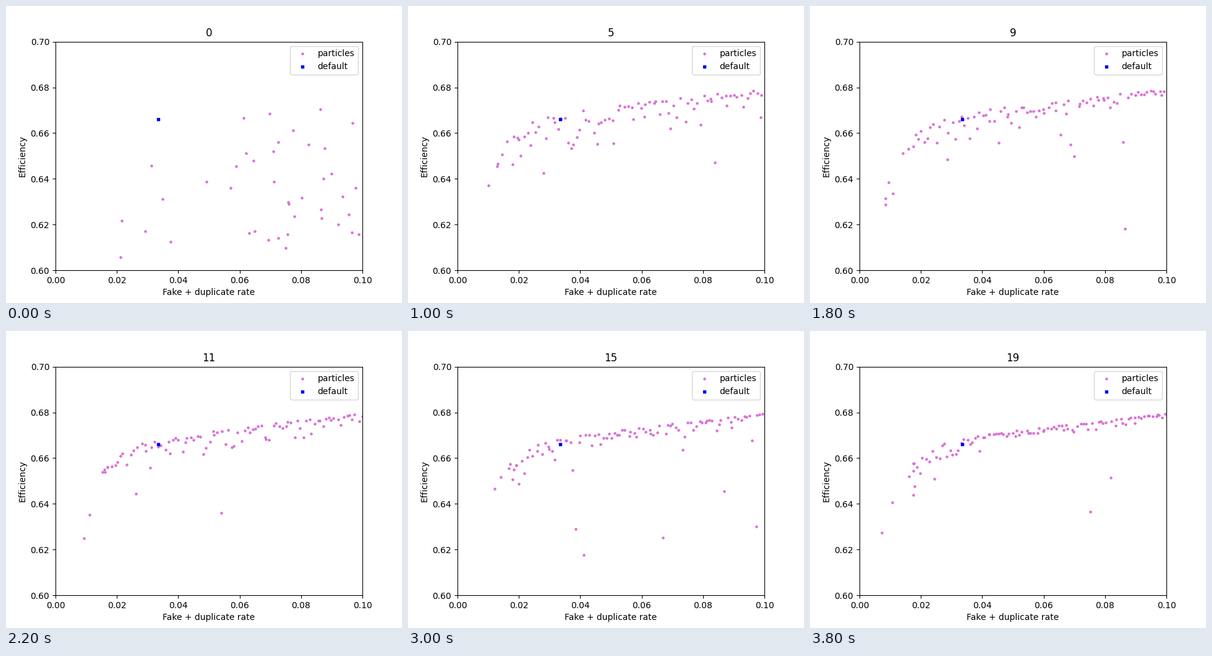
Animation, 640 px wide and 480 px high, one loop 4000 ms. Source, as a matplotlib script:

```python
import numpy as np
import matplotlib.pyplot as plt
from matplotlib.animation import FuncAnimation

STEPS, STEP_MS = 20, 200
X_MAX = .1


def front(x):
    """Best efficiency reachable at a given rate."""
    return .6645 + .15 * x - .1 * np.exp(-138 * x)


def opening(rng, n=41):
    """Wide random scatter below the front."""
    x = .016 + .084 * rng.rand(n) ** .7
    return x, .6 + (front(x) - .606) * rng.rand(n) ** .7


def gathering(rng, step):
    """Particles close in on the front; a few stray or run ahead on the left."""
    n = int(80 + step - 60 * np.exp(-step))
    body = .016 + .086 * (np.arange(n) + rng.rand(n)) / n
    ahead = rng.uniform(.006 + .01 * np.exp(-step / 4), .02, 5)
    x = np.concatenate([body, ahead])

    spread = (.002 + .012 * np.exp(-step / 2.5)) * (2 - 1.5 * x / X_MAX)
    gap = rng.exponential(spread)
    stray = rng.rand(x.size) < .07 + .15 * np.exp(-step / 3)
    gap += stray * rng.exponential(.02, x.size)
    return x, front(x) - gap


def swarm(step):
    rng = np.random.RandomState(step)
    return np.column_stack(gathering(rng, step) if step else opening(rng))


fig, ax = plt.subplots(figsize=(6.4, 4.8), dpi=100)
dots = ax.scatter([], [], s=5, color="orchid", label="particles")
ax.scatter([.0335], [.666], s=5, color="blue", marker="s", label="default", zorder=3)
ax.set(xlim=(0, X_MAX), ylim=(.6, .7),
       xlabel="Fake + duplicate rate", ylabel="Efficiency")
ax.legend(loc="upper right")
title = ax.set_title("0")


def draw(step):
    dots.set_offsets(swarm(step))
    title.set_text(str(step))
    return dots, title


anim = FuncAnimation(fig, draw, frames=STEPS, interval=STEP_MS,
                     repeat=True, repeat_delay=0, blit=False)
plt.show()
```
